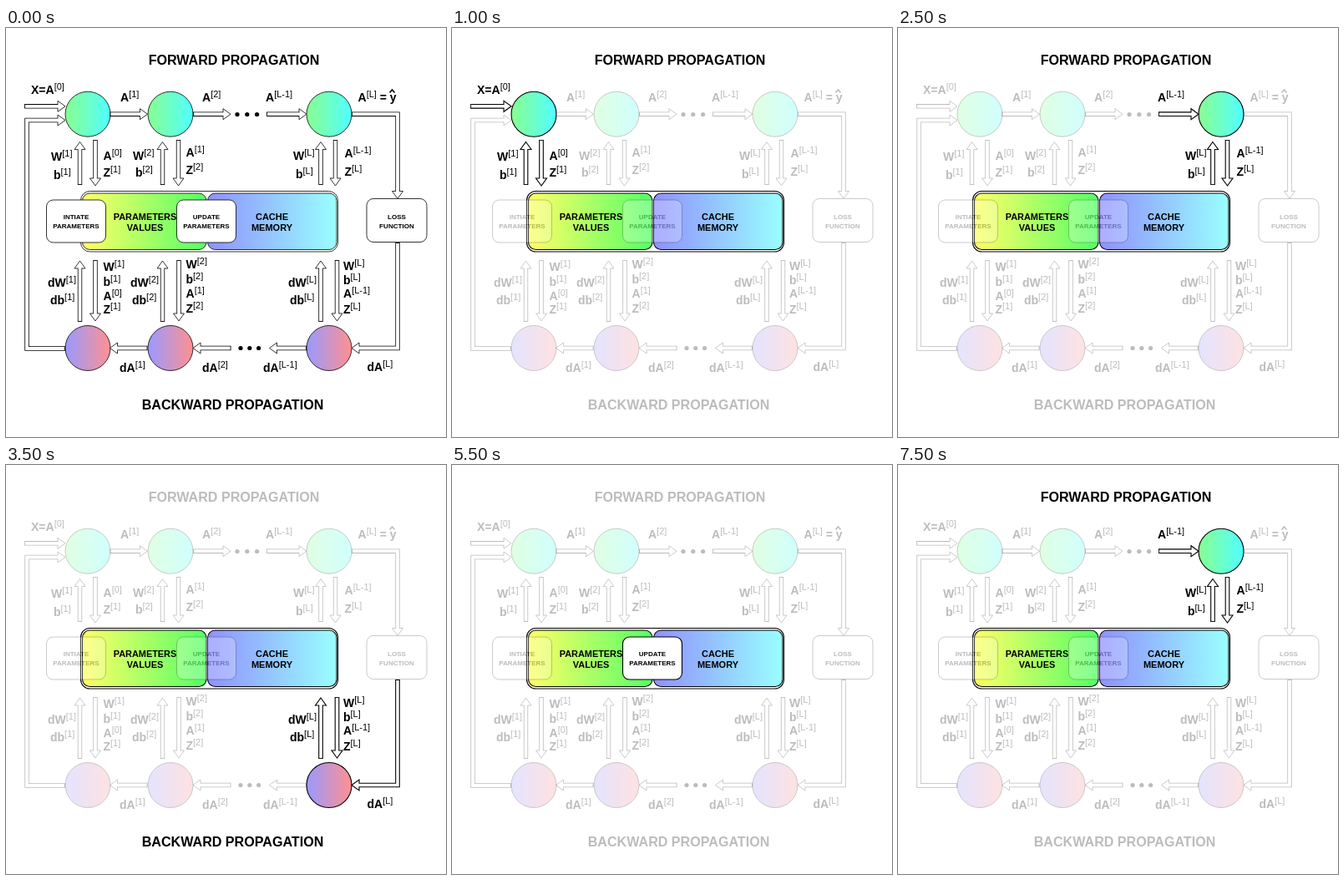
Recreate the animation shown at these times as an HTML page. Size 527 px wide and 490 px high, loop 8 s.

```html
<!DOCTYPE html>
<html lang="en">
<head>
<meta charset="utf-8">
<title>Forward and backward propagation</title>
<style>
  html, body { margin: 0; width: 100%; height: 100%; overflow: hidden; background: #fff; }
  svg { display: block; width: 527px; height: 490px; }
  text { font: bold 14px "Liberation Sans", Arial, sans-serif; white-space: pre; }
  .sup { font-size: 11px; font-weight: 400; }
  g { --line: .8px; }
  g.lit { --line: 1.1px; }
  g.dim { opacity: .26; }
  .shape { stroke: #000; stroke-width: var(--line); }
  .edge, .core { fill: none; stroke: #000; stroke-width: calc(4.6px + var(--line)); }
  .core { stroke: #fff; stroke-width: calc(4.6px - var(--line)); }
</style>
</head>
<body>
<svg id="stage" viewBox="0 0 527 490" xmlns="http://www.w3.org/2000/svg"></svg>
<script>
const NS = "http://www.w3.org/2000/svg";
const stage = document.getElementById("stage");
const groups = [];

function add(parent, tag, attrs, content) {
  const node = document.createElementNS(NS, tag);
  for (const name in attrs) node.setAttribute(name, attrs[name]);
  if (content !== undefined) node.textContent = content;
  parent.appendChild(node);
  return node;
}

function group(key) {
  const node = add(stage, "g", {});
  groups.push({ key, node });
  return node;
}

function gradient(id, from, to) {
  const node = add(stage, "linearGradient", { id });
  add(node, "stop", { offset: 0, "stop-color": from });
  add(node, "stop", { offset: 1, "stop-color": to });
}

function label(parent, x, y, base, index, tail) {
  const text = add(parent, "text", { x, y }, base);
  add(text, "tspan", { dy: -5, class: "sup" }, `[${index}]`);
  if (tail) add(text, "tspan", { dy: 5 }, tail);
}

function centred(parent, x, y, size, words) {
  add(parent, "text", { x, y, "text-anchor": "middle", style: `font-size:${size}px` }, words);
}

// Hollow block arrow along a polyline of [x, y] points, tip at the last one.
function arrow(parent, ...points) {
  const tip = points.at(-1), prev = points.at(-2), [start, second] = points;
  const unit = (a, b) => {
    const length = Math.hypot(b[0] - a[0], b[1] - a[1]);
    return [(b[0] - a[0]) / length, (b[1] - a[1]) / length];
  };
  const [ux, uy] = unit(prev, tip);
  const [sx, sy] = unit(start, second);
  const back = (along, side) => [tip[0] - ux * along - uy * side, tip[1] - uy * along + ux * side];
  const middle = points.slice(1, -1);
  add(parent, "polyline", { class: "edge", points: [start, ...middle, back(9, 0)].join(" ") });
  add(parent, "polygon", { class: "shape", fill: "#fff", points: [tip, back(9, 6.5), back(9, -6.5)].join(" ") });
  const inside = [start[0] + sx * 0.9, start[1] + sy * 0.9];
  add(parent, "polyline", { class: "core", points: [inside, ...middle, back(7.8, 0)].join(" ") });
}

function box(parent, x, y, width, height, rx, fill) {
  add(parent, "rect", { x, y, width, height, rx, fill, class: "shape" });
}

function neuron(parent, cx, cy, fill) {
  add(parent, "circle", { cx, cy, r: 27, fill, class: "shape" });
}

function dots(parent, x, y, gap) {
  for (let i = 0; i < 3; i++) add(parent, "circle", { cx: x + i * gap, cy: y, r: 2.6 });
}

function caption(parent, x, size, first, second, lines) {
  centred(parent, x, lines[0], size, first);
  centred(parent, x, lines[1], size, second);
}

gradient("green", "#88ff90", "#50ffff");
gradient("rose", "#9999ff", "#ff9090");
gradient("lime", "#ffff66", "#55ff66");
gradient("sky", "#9090ff", "#99ffff");

centred(group("fwd"), 273, 44, 16.1, "FORWARD PROPAGATION");
centred(group("bwd"), 271.5, 457, 16.1, "BACKWARD PROPAGATION");

const TOP = 103.2, BOTTOM = 383.5;

const back = group("return");
arrow(back, [71, 384], [25, 384], [25, 110.5], [71, 110.5]);

const input = group("input");
label(input, 30, 78.5, "X=A", 0);
arrow(input, [22, 93.8], [71, 93.8]);

// Per layer: index, previous index, centre, then arrow columns, label columns and label rows.
const layers = [
  { n: "1", p: "0", x: 98, up: 88.5, down: [107, 107], wb: [54, 57], az: 116.5, rows: [158.5, 180.5, 157.5, 178],
    dwb: [50, 53], col: 116.5, tall: [290.5, 309, 326, 342] },
  { n: "2", p: "1", x: 197, up: 187.5, down: [206.5, 207], wb: [152, 155], az: 215.5, rows: [158, 177.5, 154, 175],
    dwb: [149, 151], col: 215.5, tall: [287.5, 306, 323, 341] },
  { n: "L", p: "L-1", x: 387, up: 377, down: [394.5, 396.5], wb: [344, 347], az: 405.5, rows: [158, 179.5, 155, 176.5],
    dwb: [338, 340], col: 404, tall: [289.5, 307, 323, 341.5] }
];

for (const l of layers) {
  const f = group("f" + l.n);
  arrow(f, [l.up, 188], [l.up, 136.5]);
  arrow(f, [l.down[0], 134], [l.down[0], 189]);
  label(f, l.wb[0], l.rows[0], "W", l.n);
  label(f, l.wb[1], l.rows[1], "b", l.n);
  label(f, l.az, l.rows[2], "A", l.p);
  label(f, l.az, l.rows[3], "Z", l.n);
  neuron(f, l.x, TOP, "url(#green)");

  const b = group("b" + l.n);
  arrow(b, [l.up, 352], [l.up, 279]);
  arrow(b, [l.down[1], 278], [l.down[1], 351]);
  label(b, l.dwb[0], 309.5, "dW", l.n);
  label(b, l.dwb[1], 330.5, "db", l.n);
  ["W", "b", "A", "Z"].forEach((name, i) =>
    label(b, l.col, l.tall[i], name, name === "A" ? l.p : l.n));
  neuron(b, l.x, BOTTOM, "url(#rose)");
}

// Horizontal links along the top and bottom rows.
function link(key, x, y, base, index, ...points) {
  const g = group(key);
  arrow(g, ...points);
  label(g, x, y, base, index);
  return g;
}

link("f2", 137, 88, "A", "1", [124.5, TOP], [169.5, TOP]);
dots(link("fDots", 235, 88, "A", "2", [224, TOP], [269, TOP]), 277, 103.5, 11.8);
link("fL", 311, 88, "A", "L-1", [312, TOP], [360, TOP]);
link("bL", 432.5, 411, "dA", "L", [469, 257], [469, BOTTOM], [414, BOTTOM]);
dots(link("bDots", 308, 412, "dA", "L-1", [360, BOTTOM], [315.5, BOTTOM]), 281, BOTTOM, 10.8);
link("b2", 235, 412, "dA", "2", [269.5, BOTTOM], [224, BOTTOM]);
link("b1", 136, 412, "dA", "1", [169.5, BOTTOM], [124.5, BOTTOM]);

const loss = group("loss");
arrow(loss, [414, TOP], [469, TOP], [469, 204.5]);
label(loss, 421.5, 88, "A", "L", " = y");
add(loss, "path", { d: "M459.5 77.5l3-3.6 3 3.6", fill: "none", stroke: "#000", "stroke-width": 1.6 });
box(loss, 432, 204.5, 72, 52, 8, "#fff");
caption(loss, 468, 8.1, "LOSS", "FUNCTION", [229, 239.5]);

box(group("frame"), 89.5, 195.5, 308, 72.5, 11, "#fff");

const params = group("params");
box(params, 91.5, 198, 148.5, 67.5, 9, "url(#lime)");
caption(params, 166.5, 10.9, "PARAMETERS", "VALUES", [230, 243]);

const cache = group("cache");
box(cache, 241.5, 198, 154.5, 67.5, 9, "url(#sky)");
caption(cache, 318.5, 11, "CACHE", "MEMORY", [230, 243]);

const init = group("init");
box(init, 48.5, 206, 71, 51, 8, "#fff");
caption(init, 84, 8, "INTIATE", "PARAMETERS", [229, 240]);

const update = group("update");
box(update, 204.5, 206, 71, 51, 8, "#fff");
caption(update, 240, 8, "UPDATE", "PARAMETERS", [229, 240]);

const STEP = 500;
const memory = "frame params cache";
const forward = ["f2", "fDots", "fL"].map(key => `fwd ${key} ${memory}`);
const backward = ["bL", "bDots", "b2", "b1"].map(key => `bwd ${key} ${memory}`);
const steps = [
  "all",
  "init params",
  `fwd input f1 ${memory}`,
  ...forward,
  "loss",
  ...backward,
  `update ${memory}`,
  `fwd input return f1 ${memory}`,
  ...forward
].map(step => step.split(" "));

let shown = -1;
function render(time) {
  const index = Math.floor(time / STEP) % steps.length;
  if (index === shown) return;
  shown = index;
  const active = steps[index];
  for (const { key, node } of groups) {
    const state = active[0] === "all" ? "" : active.includes(key) ? "lit" : "dim";
    node.setAttribute("class", state);
  }
}

const began = performance.now();
function tick() {
  render(performance.now() - began);
  requestAnimationFrame(tick);
}
tick();
</script>
</body>
</html>
```
